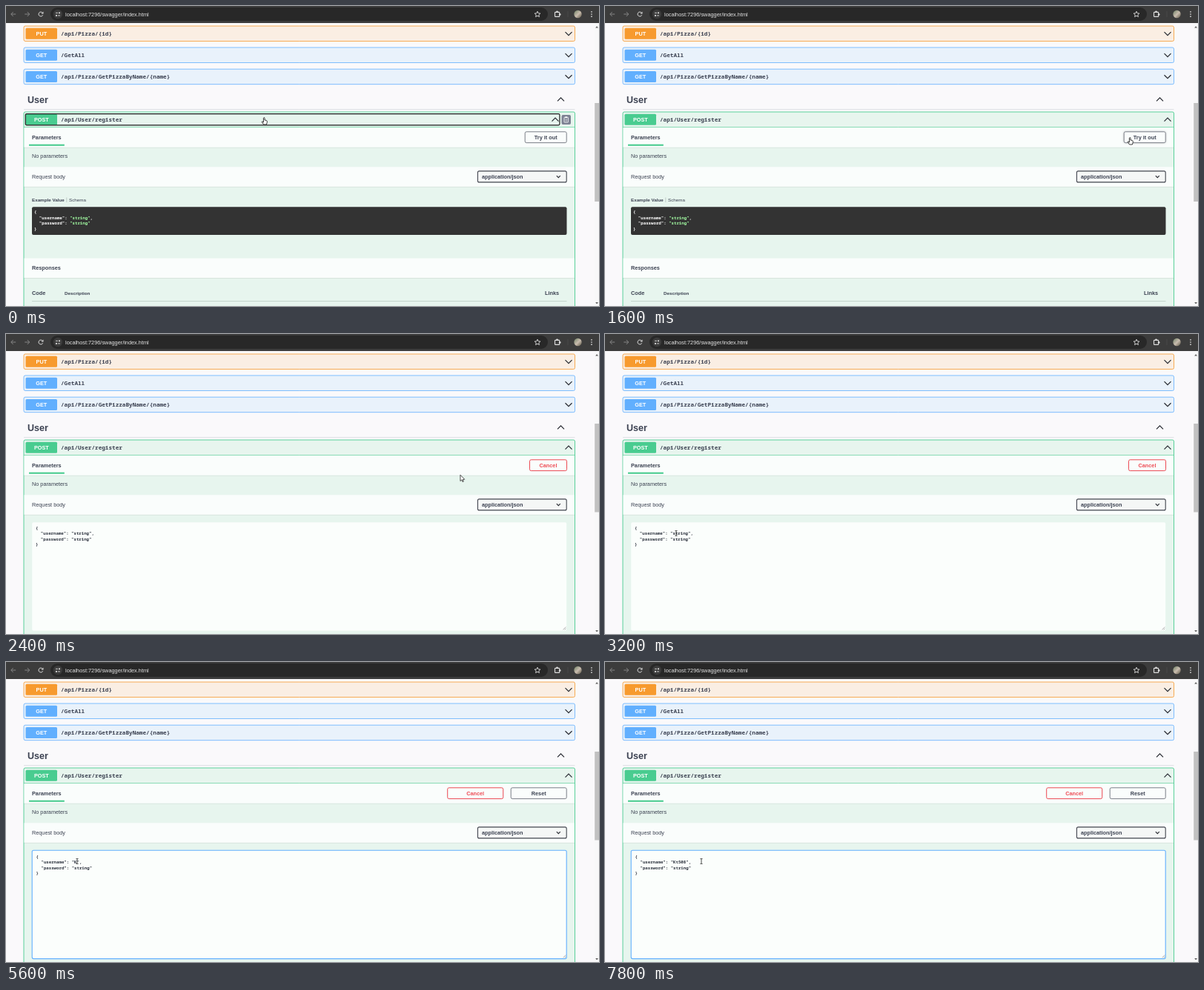
An HTML page with a canvas for the animation above (8000 ms loop, 800 by 405 pixels).

```html
<!DOCTYPE html>
<html lang="en">
<head>
<meta charset="utf-8">
<title>API explorer</title>
<style>
html, body { margin: 0; width: 100%; height: 100%; overflow: hidden; background: #faf9fb; }
canvas { display: block; width: 800px; height: 405px; }
</style>
</head>
<body>
<canvas id="stage"></canvas>
<script>
const W = 800, H = 405, LOOP = 8000, STEP = 200;
const canvas = document.getElementById('stage');
const c = canvas.getContext('2d');
const ratio = window.devicePixelRatio || 1;
canvas.width = W * ratio;
canvas.height = H * ratio;

const SANS = '"Liberation Sans", Arial, sans-serif';
const MONO = '"Noto Sans Mono", monospace';
const INK = '#3b4151', GREEN = '#49cc90', BLUE = '#61affe', ORANGE = '#f79a2e', RED = '#ee4c55';
const MINT = '#e7f5ee', PANEL = '#fafdfc';
const CODE_SIZE = 5.73, CODE_W = CODE_SIZE * 0.6, LINE_H = 7.45;

// Times at which the page changes
const PRESS = 1600, EDIT = 1800, FOCUS = 3600, SELECT = 3800;
const KEYS = [5000, 6200, 6600, 6800, 7000];
const USERNAME = 'Kt508';

// Pointer stops: time, x, y
const PATH = [
  [0, 349, 155], [1200, 709, 182], [1600, 709, 182], [1800, 711, 181],
  [2200, 711, 181], [3000, 96, 269], [7000, 96, 269], [7600, 130, 269], [LOOP, 130, 269]
];

function pointerAt(t) {
  const i = PATH.findIndex((p, n) => n > 0 && t <= p[0]);
  const [t0, x0, y0] = PATH[i - 1], [t1, x1, y1] = PATH[i];
  const u = (t - t0) / (t1 - t0), e = u * u * (3 - 2 * u);
  return { x: x0 + (x1 - x0) * e, y: y0 + (y1 - y0) * e };
}

function rect(x, y, w, h, fill) {
  c.fillStyle = fill;
  c.fillRect(x, y, w, h);
}

function box(x, y, w, h, r, fill, stroke, lw = 1) {
  c.beginPath();
  c.roundRect(x, y, w, h, r);
  if (fill) { c.fillStyle = fill; c.fill(); }
  if (stroke) { c.strokeStyle = stroke; c.lineWidth = lw; c.stroke(); }
}

function text(s, x, y, size, color = INK, weight = 400, family = SANS, align = 'left') {
  c.font = `${weight} ${size}px ${family}`;
  c.fillStyle = color;
  c.textAlign = align;
  c.fillText(s, x, y);
}

function line(points, color, lw = 1) {
  c.beginPath();
  points.forEach(([x, y]) => c.lineTo(x, y));
  c.strokeStyle = color;
  c.lineWidth = lw;
  c.stroke();
}

function shape(points, fill, stroke, lw = 0.8) {
  c.beginPath();
  points.forEach(([x, y]) => c.lineTo(x, y));
  c.closePath();
  if (fill) { c.fillStyle = fill; c.fill(); }
  if (stroke) { c.strokeStyle = stroke; c.lineWidth = lw; c.stroke(); }
}

function dot(x, y, r, fill) {
  c.beginPath();
  c.arc(x, y, r, 0, 7);
  c.fillStyle = fill;
  c.fill();
}

function chevron(x, y, up, size = 4.5, color = '#25282f', lw = 1.2) {
  const d = size * (up ? -0.5 : 0.5);
  line([[x - size, y - d], [x, y + d], [x + size, y - d]], color, lw);
}

function toolbar() {
  rect(0, 0, W, 23, '#3c3c3c');
  box(60, 2, 671, 18, 9, '#282828');
  const arrow = (x, d) => {
    line([[x - 3.2, 11], [x + 3.2, 11]], '#858585');
    line([[x + d * 0.3, 8], [x + d * 3.2, 11], [x + d * 0.3, 14]], '#858585');
  };
  arrow(10, -1);
  arrow(28.5, 1);

  c.beginPath();
  c.arc(47, 11, 3, 0.4, 5.6);
  c.strokeStyle = '#d5d5d5';
  c.lineWidth = 1;
  c.stroke();
  shape([[50.5, 7.4], [50.5, 10.5], [47.4, 10.5]], '#d5d5d5');

  dot(70, 11, 6.2, '#3c3c3c');
  line([[67, 9.3], [70, 9.3]], '#dcdcdc', 0.9);
  line([[70, 12.9], [73, 12.9]], '#dcdcdc', 0.9);
  dot(72, 9.3, 1.1, '#dcdcdc');
  dot(68, 12.9, 1.1, '#dcdcdc');
  text('localhost:7296/swagger/index.html', 80, 13.7, 7.35, '#e3e3e3');

  const star = Array.from({ length: 10 }, (_, i) => {
    const a = i * Math.PI / 5 - Math.PI / 2, r = i % 2 ? 1.9 : 4.1;
    return [717 + r * Math.cos(a), 11.3 + r * Math.sin(a)];
  });
  shape(star, null, '#dedede', 0.9);

  box(740.5, 8.4, 6.2, 6, 0.7, null, '#dedede', 1.1);
  dot(743.5, 7.8, 1.3, '#dedede');
  dot(747.2, 11.4, 1.3, '#dedede');
  line([[758, 7], [758, 15]], '#4d4d4d', 0.8);

  const glow = c.createLinearGradient(767, 7, 776, 16);
  glow.addColorStop(0, '#7e8c72');
  glow.addColorStop(0.5, '#c9bcae');
  glow.addColorStop(1, '#66604f');
  dot(771.5, 11, 5.2, glow);
  [7.8, 11, 14.2].forEach(y => dot(790, y, 0.85, '#dedede'));
}

function badge(label, y, color) {
  box(26.5, y, 42.5, 15, 1.5, color);
  text(label, 47.8, y + 10.2, 7.29, '#fff', 700, SANS, 'center');
}

function route(method, path, y, color, fill) {
  box(24, y, 743.5, 20.5, 2, fill, color, 0.8);
  badge(method, y + 2.7, color);
  text(path, 74, y + 13, 7.68, INK, 600, MONO);
  chevron(759, y + 10.3, false);
}

function band(y, h) {
  rect(24.5, y + h, 742.5, 1, 'rgba(0,0,0,.07)');
  rect(24.5, y, 742.5, h, PANEL);
}

function button(label, x, w, color, border = color, hover = false) {
  c.save();
  c.shadowColor = hover ? 'rgba(0,0,0,.35)' : 'rgba(0,0,0,.12)';
  c.shadowBlur = (hover ? 3 : 1.5) * ratio;
  box(x, 169.8, w, 14.8, 2, PANEL);
  c.restore();
  box(x, 169.8, w, 14.8, 2, null, border, 1);
  text(label, x + w / 2, 179.5, 7.29, color, 700, SANS, 'center');
}

function bodyLines(user) {
  return ['{', `  "username": "${user}",`, '  "password": "string"', '}'];
}

function example() {
  text('Example Value', 35, 264, 6.25, INK, 700);
  line([[81.8, 258.5], [81.8, 265]], '#a4b0ad', 0.6);
  text('Schema', 85, 264, 6.25);
  box(35, 271.3, 721.5, 37.7, 2, '#333');
  bodyLines('string').forEach((s, i) => {
    const y = 280.3 + i * LINE_H;
    text(s, 38, y, CODE_SIZE, '#fff', 700, MONO);
    const at = s.indexOf('"string"');
    if (at > 0) {
      const x = 38 + at * CODE_W;
      rect(x, y - 5.3, 8 * CODE_W, 7, '#333');
      text('"string"', x, y, CODE_SIZE, '#a2fca2', 700, MONO);
    }
  });
  band(340.5, 26.5);
  text('Responses', 35, 355.7, 7.29, INK, 700);
  text('Code', 35, 389.8, 7.29, INK, 700);
  text('Description', 79, 389.8, 6.25, INK, 700);
  text('Links', 727, 389.8, 7.29, INK, 700);
  line([[35, 398.5], [756.5, 398.5]], '#bccdc5', 0.8);
}

function editor(t) {
  const focused = t >= FOCUS, shift = focused ? 0.6 : 0;
  const typed = KEYS.filter(k => t >= k).length;
  const user = typed ? USERNAME.slice(0, typed) : 'string';
  box(35.2, 254.2, 721, 146.4, 2, '#fbfefc', focused ? BLUE : null, 1.1);
  const x = 40 + shift, y = 264 + shift;
  bodyLines(user).forEach((s, i) => text(s, x, y + i * LINE_H, CODE_SIZE, '#2f3440', 600, MONO));
  if (t >= SELECT && !typed) {
    const sx = x + 15 * CODE_W, sy = y + LINE_H;
    rect(sx, sy - 5.3, 6 * CODE_W, 7.2, '#1b63c4');
    text('string', sx, sy, CODE_SIZE, '#fff', 600, MONO);
  }
  line([[751.5, 399.3], [755.3, 395.5]], '#777', 0.6);
  line([[753.7, 399.3], [755.3, 397.7]], '#777', 0.6);
}

function buttons(t, p) {
  if (t < EDIT) button('Try it out', 700.2, 56, INK, '#7d818a', p.x > 700 && p.y > 169);
  else if (t < EDIT + STEP) button('Cancel', 706.5, 50, INK, '#6d717b', true);
  else if (t < KEYS[0]) button('Cancel', 706.5, 50, RED, RED, p.x > 706);
  else {
    button('Cancel', 595.7, 75, RED);
    button('Reset', 681.2, 75, INK, '#7d818a');
  }
}

function operation(t, p) {
  box(24, 143, 743.5, 300, 2, MINT, GREEN, 0.9);
  badge('POST', 145.8, GREEN);
  text('/api/User/register', 74, 156.1, 7.68, INK, 600, MONO);
  line([[24, 163.7], [767.5, 163.7]], GREEN, 0.7);
  const hover = p.y < 164;
  chevron(hover ? 741 : 759, 153.4, true);
  if (t < PRESS) box(26.3, 145.6, hover ? 720.6 : 738.5, 15.2, 1.5, null, '#1b1e1d', 1.2);
  if (hover) {
    box(749.5, 147, 12.5, 13, 2, '#7d8293');
    box(753, 150.3, 5.4, 6.8, 0.5, null, '#fff', 0.8);
    rect(754.3, 149.4, 2.8, 1.8, '#fff');
    line([[754.5, 153.3], [757, 153.3]], '#fff', 0.6);
    line([[754.5, 155.1], [757, 155.1]], '#fff', 0.6);
  }

  band(164.2, 26.5);
  text('Parameters', 35, 179.5, 7.29, INK, 700);
  rect(31, 186.7, 47.8, 2.1, GREEN);
  buttons(t, p);
  text('No parameters', 35, 204.6, 7.29);

  band(217.3, 26.5);
  text('Request body', 35, 232.6, 7.29);
  box(636.4, 222.9, 119.8, 15, 2, '#f5f7f6', '#41444e', 1.1);
  text('application/json', 642, 232.6, 7.29, INK, 700);
  chevron(745.3, 230.4, false, 2.5, '#25282f', 1.1);

  if (t < EDIT) example();
  else editor(t);
}

function scrollbar(t) {
  rect(793.8, 23, 6.2, H - 23, '#f8f8f9');
  const [y, h] = t < EDIT ? [131, 133] : [121, 119.5];
  rect(794.2, y, 5.8, h, '#c1c1c1');
  shape([[795.2, 29.4], [799, 29.4], [797.1, 27.2]], '#555');
  shape([[795.2, 400], [799, 400], [797.1, 402.2]], '#555');
}

const HAND = [
  [-1.6, -3.8], [-0.8, -4.6], [0, -3.8], [0, -1], [2.3, -0.6], [3.2, 0.2], [3.2, 2.6],
  [2.4, 5], [-1.4, 5], [-3.8, 1.6], [-3.3, 0.8], [-1.6, 2]
];
const ARROW = [[-2, -4.5], [-2, 3.8], [-0.1, 2.1], [1.2, 4.9], [2.4, 4.3], [1.2, 1.7], [3.8, 1.5]];

function pointer(t, { x, y }) {
  const onButton = y > 169 && y < 186 && x > 700;
  c.save();
  c.translate(x, y);
  c.lineJoin = 'round';
  if (y < 164 || onButton) shape(HAND, '#fff', '#222', 0.9);
  else if (t >= EDIT && y > 254) {
    line([[-1.6, -3.4], [1.6, -3.4]], '#222', 0.7);
    line([[0, -3.4], [0, 3.4]], '#222', 0.8);
    line([[-1.6, 3.4], [1.6, 3.4]], '#222', 0.7);
  } else shape(ARROW, '#fff', '#222', 0.8);
  c.restore();
}

function draw(t) {
  const p = pointerAt(t);
  c.setTransform(ratio, 0, 0, ratio, 0, 0);
  rect(0, 0, W, H, '#faf9fb');
  route('PUT', '/api/Pizza/{id}', 27, ORANGE, '#faeee3');
  route('GET', '/GetAll', 56, BLUE, '#e9f2fb');
  route('GET', '/api/Pizza/GetPizzaByName/{name}', 85.2, BLUE, '#e9f2fb');
  text('User', 29, 130.8, 12.5, INK, 700);
  chevron(748.5, 126.2, true);
  line([[24, 139.7], [767.5, 139.7]], '#d5d6dc', 0.8);
  operation(t, p);
  scrollbar(t);
  toolbar();
  pointer(t, p);
}

function frame() {
  const t = performance.now() % LOOP;
  draw(Math.floor(t / STEP) * STEP);
  requestAnimationFrame(frame);
}
frame();
</script>
</body>
</html>
```
